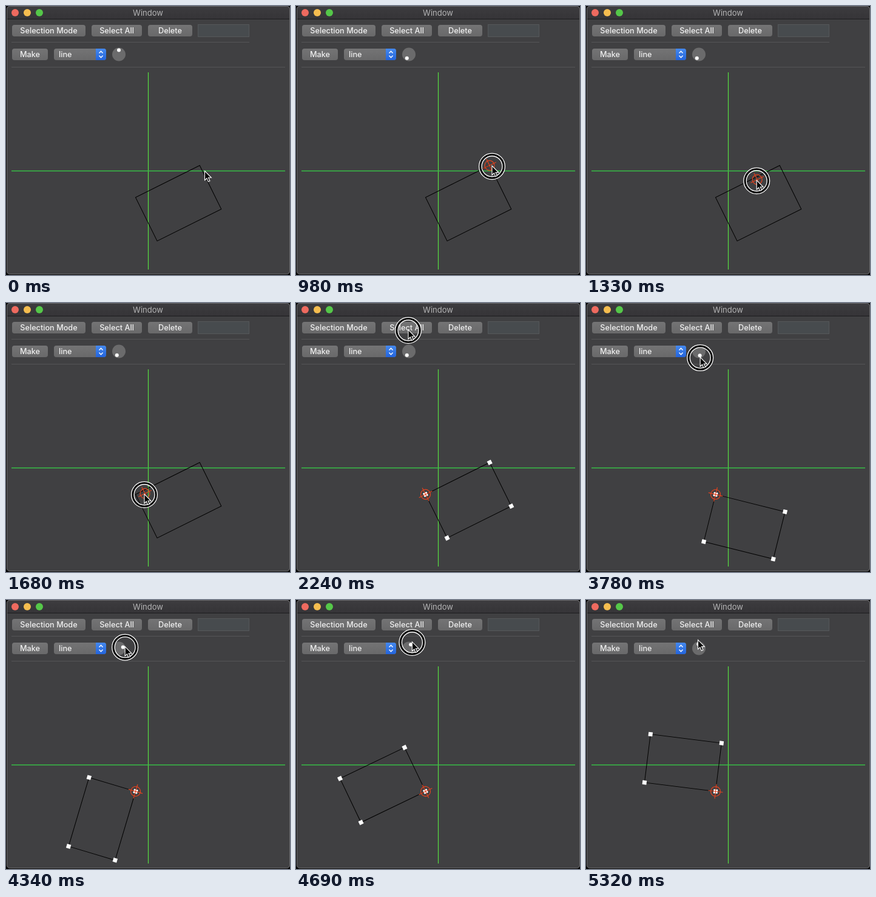
An HTML page for the animation above (5390 ms loop, 468 by 442 pixels).

```html
<!DOCTYPE html>
<html lang="en">
<head>
<meta charset="utf-8">
<title>Window</title>
<style>
  html, body { margin: 0; width: 100%; height: 100%; overflow: hidden; background: #000; }
  svg { display: block; width: 468px; height: 442px; }
  text { font: 500 12.7px Inter, "Open Sans", sans-serif; fill: #f0f0f0; }
  .title { font-weight: 400; font-size: 13px; fill: #b4b4b5; text-anchor: middle; }
  .mid { text-anchor: middle; }
  .rule { stroke: #555557; }
</style>
</head>
<body>
<svg viewBox="0 0 468 442">
  <defs>
    <linearGradient id="bar" x2="0" y2="1"><stop stop-color="#3d3c3f"/><stop offset="1" stop-color="#353437"/></linearGradient>
    <linearGradient id="btn" x2="0" y2="1"><stop stop-color="#747475"/><stop offset="1" stop-color="#69696a"/></linearGradient>
    <linearGradient id="blue" x2="0" y2="1"><stop stop-color="#4589ee"/><stop offset="1" stop-color="#2364dc"/></linearGradient>
    <clipPath id="view"><rect x="9" y="109" width="451" height="325"/></clipPath>
    <clipPath id="frame"><rect x="1" width="467" height="441" rx="5"/></clipPath>
  </defs>
  <rect width="468" height="442"/>
  <g clip-path="url(#frame)">
    <rect width="468" height="442" fill="#404042"/>
    <rect width="468" height="22" fill="url(#bar)"/>
    <path d="M0 21.5H468" stroke="#1d1d1f"/>
  </g>
  <rect x="1.5" y=".5" width="466" height="440" rx="5" fill="none" stroke="#69696b"/>
  <circle cx="15" cy="11" r="6" fill="#ee6a5f"/>
  <circle cx="35" cy="11" r="6" fill="#f5bd4f"/>
  <circle cx="55" cy="11" r="6" fill="#55c749"/>
  <text class="title" x="234" y="16">Window</text>

  <g id="buttons"></g>
  <rect x="316.5" y="30.5" width="84" height="20" fill="#474b4e" stroke="#55585a"/>
  <path class="rule" d="M9 59.5H401M9 100.5H460"/>
  <rect x="79" y="70" width="86" height="19" rx="4" fill="url(#btn)"/>
  <path d="M148 70h13a4 4 0 0 1 4 4v11a4 4 0 0 1-4 4h-13z" fill="url(#blue)"/>
  <path d="M153.5 77.5l3-3.3 3 3.3M153.5 81.5l3 3.3 3-3.3" fill="none" stroke="#fff" stroke-width="1.4"/>
  <text x="87" y="84">line</text>
  <circle cx="186" cy="79.5" r="11" fill="#6b6b6c"/>
  <circle id="knob" r="3" fill="#fff"/>

  <path d="M234.5 109V433" stroke="#58df42" stroke-width="1.2"/>
  <path d="M9 271H460" stroke="#37bd46" stroke-width="1.7"/>

  <g clip-path="url(#view)">
    <g id="shape">
      <rect width="118" height="80" fill="none" stroke="#000"/>
      <g id="handles" fill="#fff"></g>
    </g>
    <g id="target" fill="none" stroke="#e4431f" stroke-width="1.2">
      <circle r="8"/><path d="M-12 0H12M0-12V12"/>
    </g>
  </g>

  <g id="pointer">
    <g id="ring" fill="none" transform="translate(0 1)">
      <circle r="19.3" stroke="#000" stroke-width="4.4"/>
      <circle r="21.4" stroke="#fff" stroke-width="1.3"/>
      <circle r="17" stroke="#fff" stroke-width="1.3"/>
    </g>
    <path d="M0 0V15.2L3.4 12L5.8 17.6L8.4 16.5L6 11H10.8Z" stroke="#fff" stroke-width="1.1"/>
  </g>
</svg>
<script>
const LOOP = 5390, STEP = 70;
const PIVOT = [213.5, 314.5], CORNER = [319, 262], DIAL = [186, 79.5];
const BASE_ANGLE = -26.4;
const PRESS = 700, SNAP = 1780, SELECT = 2240, GRAB = 3000;
const CLICKS = [[PRESS, SNAP], [2170, 2380], [GRAB, 5180]];

const el = id => document.getElementById(id);
const move = (id, [x, y], angle = 0) =>
  el(id).setAttribute('transform', `translate(${x} ${y}) rotate(${angle})`);
const show = (id, on) => el(id).setAttribute('visibility', on ? 'visible' : 'hidden');
const polar = ([x, y], r, deg) =>
  [x + r * Math.cos(deg * Math.PI / 180), y + r * Math.sin(deg * Math.PI / 180)];

// Smooth curve through [time, value] points, without overshoot
function curve(points) {
  const slope = i => (points[i + 1][1] - points[i][1]) / (points[i + 1][0] - points[i][0]);
  const tangent = i => {
    if (i === 0 || i === points.length - 1) return 0;
    const a = slope(i - 1), b = slope(i);
    return a * b <= 0 ? 0 : 2 * a * b / (a + b);
  };
  return t => {
    if (t <= points[0][0]) return points[0][1];
    const i = points.findIndex((p, k) => k < points.length - 1 && t < points[k + 1][0]);
    if (i < 0) return points[points.length - 1][1];
    const [t0, v0] = points[i], [t1, v1] = points[i + 1];
    const h = t1 - t0, s = (t - t0) / h, q = 1 - s;
    return v0 * (1 + 2 * s) * q * q + h * tangent(i) * s * q * q
         + v1 * s * s * (3 - 2 * s) - h * tangent(i + 1) * s * s * q;
  };
}

const pointerX = curve([[0, 327.5], [630, 323], [1050, 323], [1350, 278], [1680, 228],
  [1780, 217], [2150, 185], [2380, 185], [2870, 190], [3000, 181]]);
const pointerY = curve([[0, 271], [630, 262.5], [1050, 262.5], [1350, 288], [1680, 314],
  [1780, 315], [2150, 44], [2380, 44], [2870, 103], [3000, 89.3]]);
const shapeAngle = curve([[3080, BASE_ANGLE], [3360, -17], [3780, 14], [3920, 27.7],
  [4130, 62], [4340, 106.6], [4480, 128], [4760, 162], [5040, 187.1]]);
const grabRadius = curve([[3000, 11], [3780, 9.8], [4340, 10.5], [5180, 14]]);

el('buttons').innerHTML = [
  ['Selection Mode', 10, 31, 121], ['Select All', 141, 31, 83],
  ['Delete', 234, 31, 73], ['Make', 10, 70, 59]
].map(([label, x, y, w]) =>
  `<rect x="${x}" y="${y}" width="${w}" height="19" rx="4" fill="url(#btn)"/>
   <text class="mid" x="${x + w / 2}" y="${y + 14}">${label}</text>`).join('');

el('handles').innerHTML = [[0, 0], [118, 0], [118, 80], [0, 80]].map(([x, y]) =>
  `<rect x="${x - 3.4}" y="${y - 3.4}" width="6.8" height="6.8"/>`).join('');

function draw(t) {
  const angle = shapeAngle(t);
  const dialAngle = t < PRESS ? -90 : 91 - angle;
  const pointer = t < GRAB ? [pointerX(t), pointerY(t)] : polar(DIAL, grabRadius(t), dialAngle);
  const target = t >= SNAP ? PIVOT : t < 1080 ? CORNER : [pointer[0] + 1, pointer[1] - 1];
  const [kx, ky] = polar(DIAL, 7, dialAngle);

  move('shape', PIVOT, angle);
  move('target', target, angle);
  move('pointer', pointer);
  el('knob').setAttribute('cx', kx);
  el('knob').setAttribute('cy', ky);
  show('target', t >= PRESS);
  show('handles', t >= SELECT);
  show('ring', CLICKS.some(([from, to]) => t >= from && t < to));
}

const start = performance.now();
function tick() {
  const t = (performance.now() - start) % LOOP;
  draw(Math.floor(t / STEP) * STEP);
  requestAnimationFrame(tick);
}
draw(0);
requestAnimationFrame(tick);
</script>
</body>
</html>
```
